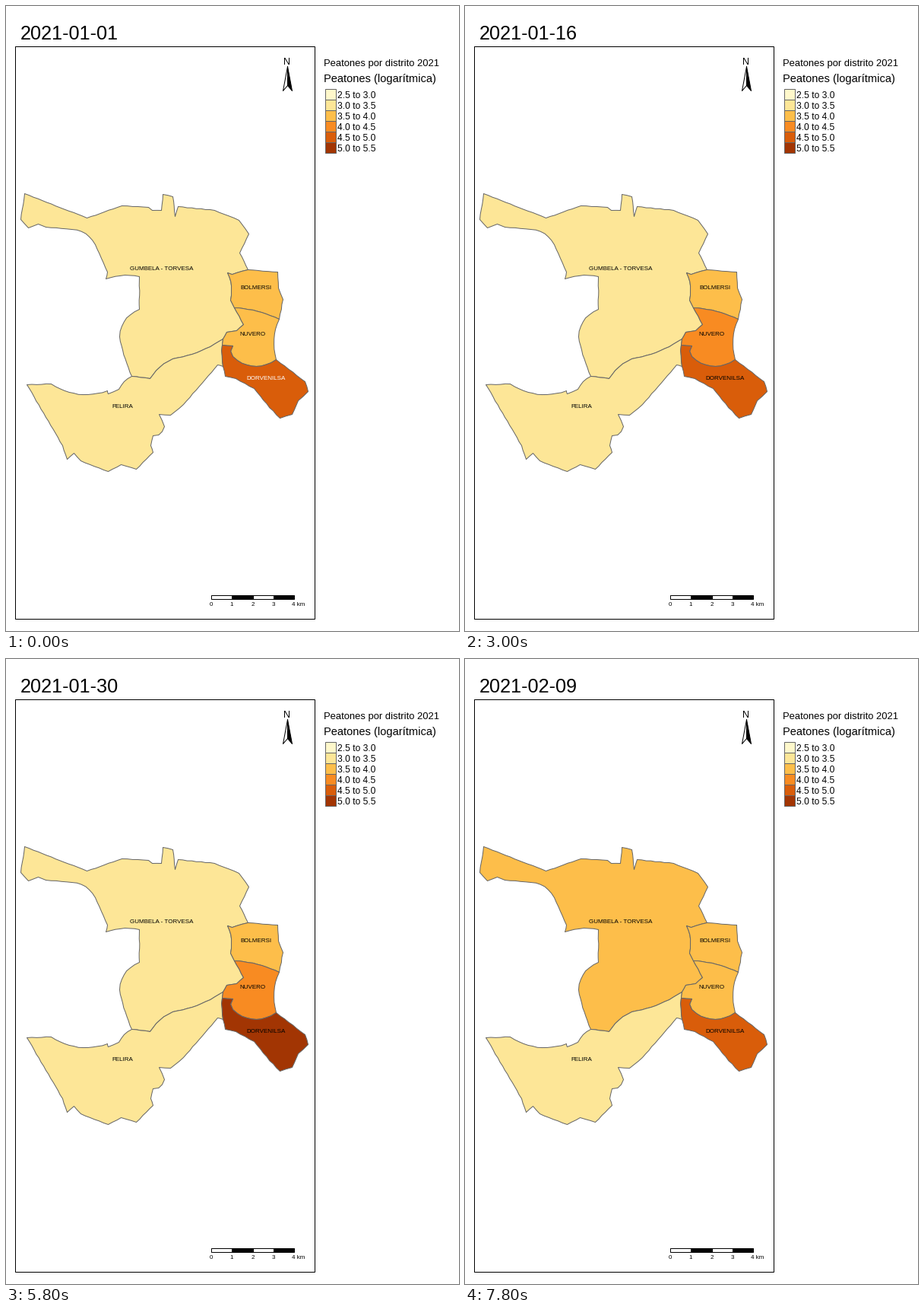
A matplotlib script that plays this animation: 596x821 px, repeating every 8000 ms.

```python
import numpy as np
import matplotlib.pyplot as plt
from matplotlib.animation import FuncAnimation
from matplotlib.patches import Polygon, Rectangle

W, H, DPI = 596, 821, 64
PX = 72 / DPI
DAYS, STEP = 40, 200
START = np.datetime64("2021-01-01")
WED, FRI, SAT, SUN = 2, 4, 5, 6

SHADES = ["#fff8cb", "#fde697", "#fdbe4a", "#f88b22", "#d95d0a", "#a23503"]
EDGE = "#666666"
rng = np.random.default_rng(4)

plt.rcParams["font.family"] = "Liberation Sans"
fig = plt.figure(figsize=(W / DPI, H / DPI), dpi=DPI, facecolor="white")
ax = fig.add_axes([0, 0, 1, 1])
ax.set_xlim(0, W)
ax.set_ylim(H, 0)
ax.axis("off")


def label(x, y, text, size, ha="left"):
    return ax.text(x, y, text, fontsize=size * PX, ha=ha, va="baseline")


def shape(points, fill, edge=EDGE):
    return ax.add_patch(Polygon(np.array(points) + 0.5, facecolor=fill,
                                edgecolor=edge, linewidth=PX, joinstyle="round"))


def box(x, y, w, h, fill, edge):
    ax.add_patch(Rectangle((x + 0.5, y + 0.5), w, h, facecolor=fill,
                           edgecolor=edge, linewidth=PX, snap=True))


def border(*knots):
    """Slightly rough line through knots (x, y[, sag]); sag bows to the left."""
    line = [np.array(knots[0], float)]
    for x, y, *sag in knots[1:]:
        a, b = line[-1], np.array([x, y], float)
        d = b - a
        size = np.hypot(*d)
        normal = np.array([d[1], -d[0]]) / size
        n = max(2, int(size / 6))
        for t in np.arange(1, n) / n:
            bow = 4 * t * (1 - t) * (sag[0] if sag else 0)
            line.append(a + d * t + normal * (bow + rng.uniform(-0.4, 0.4)))
        line.append(b)
    return np.array(line)


# Borders shared by two districts
west_south = border((165, 486), (189, 489), (219, 463, 3), (285, 437, -4))
west_north = border((318, 346), (303, 350), (291, 350, 2), (295, 386, 3), (300, 396))
west_mid = border((300, 396), (312, 418), (303, 426), (290, 428), (285, 437))
north_mid = border((300, 396), (359, 411, 3))
mid_east = border((355, 464), (298, 460, 11), (298, 446, 3), (284, 445))
east_south = border((284, 445), (285, 473, -1))

# Outer borders
west_out = border(
    (165, 486), (149, 434, 1.5), (175, 398, 7), (175, 355), (131, 358, -3),
    (133, 349), (117, 313), (86, 293, -5), (52, 290), (42, 286), (29, 291),
    (19, 280), (24, 246), (106, 278), (152, 262), (187, 264), (192, 268),
    (204, 268), (206, 247), (219, 250), (222, 276), (226, 263), (274, 268),
    (306, 281), (319, 299), (307, 324), (318, 346))
north_out = border((359, 411), (364, 385), (358, 370), (357, 349), (318, 346))
mid_out = border((359, 411), (355, 464, -5))
east_out = border(
    (285, 473), (288, 486), (302, 489), (326, 502), (360, 541, -1),
    (376, 536), (384, 518), (397, 506), (393, 493), (355, 464))
south_out = border(
    (285, 473), (278, 471), (233, 523), (216, 537), (201, 536), (208, 552),
    (193, 564, 4), (190, 577), (193, 586), (171, 608), (151, 602), (134, 611),
    (98, 597), (89, 587), (80, 595), (74, 577), (27, 497), (59, 496),
    (133, 505, -9), (134, 509), (148, 503), (165, 486, 2))

outlines = [
    (west_out, west_north, west_mid, west_south[::-1]),
    (west_south, east_south, south_out),
    (west_north, north_mid, north_out),
    (north_mid, mid_out, mid_east, west_mid[::-1]),
    (mid_east, east_south, east_out),
]
districts = [shape(np.vstack(parts), "white") for parts in outlines]

# Map frame, compass and scale bar
box(11, 52, 394, 752, "none", "black")
label(369.5, 77, "N", 12.5, "center")
for side, fill in [(364, "white"), (376, "black")]:
    shape([(370, 79), (side, 111), (370, 104)], fill, "black")
for k in range(4):
    x0, x1 = round(269 + 27.25 * k), round(269 + 27.25 * (k + 1))
    box(x0, 773, x1 - x0, 5, "black" if k % 2 else "white", "black")
    label(x0 + 0.5, 788, str(k), 8, "center")
label(384.5, 788, "4 km", 8, "center")

# Legend
label(418, 79, "Peatones por distrito 2021", 13)
label(418, 100, "Peatones (logarítmica)", 14.6)
for k, shade in enumerate(SHADES):
    box(419, 108 + 14 * k, 14, 14, shade, EDGE)
    low = 2.5 + 0.5 * k
    label(436, 121 + 14 * k, f"{low:.1f} to {low + 0.5:.1f}", 12)

for x, y, name in [(205, 347, "GUMBELA - TORVESA"), (329, 372, "BOLMERSI"),
                   (324, 433, "NUVERO"), (153.5, 528, "FELIRA")]:
    label(x, y, name, 8, "center")
east_name = label(342.5, 491, "DORVENILSA", 8, "center")
date = label(18.5, 44, "", 25.3)


def levels(day):
    """Shade index of each district: west, south, north, middle, east."""
    weekday = (day + FRI) % 7
    holiday = day in (0, 5)
    eve = day == 4
    snow = 7 <= day <= 12
    storm = day in (8, 9)
    first_busy = WED if day > 31 else FRI
    busy = first_busy <= weekday <= SAT and not (holiday or snow)

    west = 1 if weekday >= SAT or holiday or snow else 2
    south = 0 if weekday == SUN or storm else 1
    middle = 1 if storm else 3 if busy else 2
    east = 5 if eve or (weekday == SAT and day > 20) else 4
    return west, south, 2, middle, east


def draw(day):
    date.set_text(str(START + np.timedelta64(int(day), "D")))
    for patch, level in zip(districts, levels(day)):
        patch.set_facecolor(SHADES[level])
    east_name.set_color("white" if day == 0 else "black")
    return [date, east_name, *districts]


anim = FuncAnimation(fig, draw, frames=DAYS, interval=STEP, repeat=True,
                     repeat_delay=0, blit=False)
plt.show()
```
